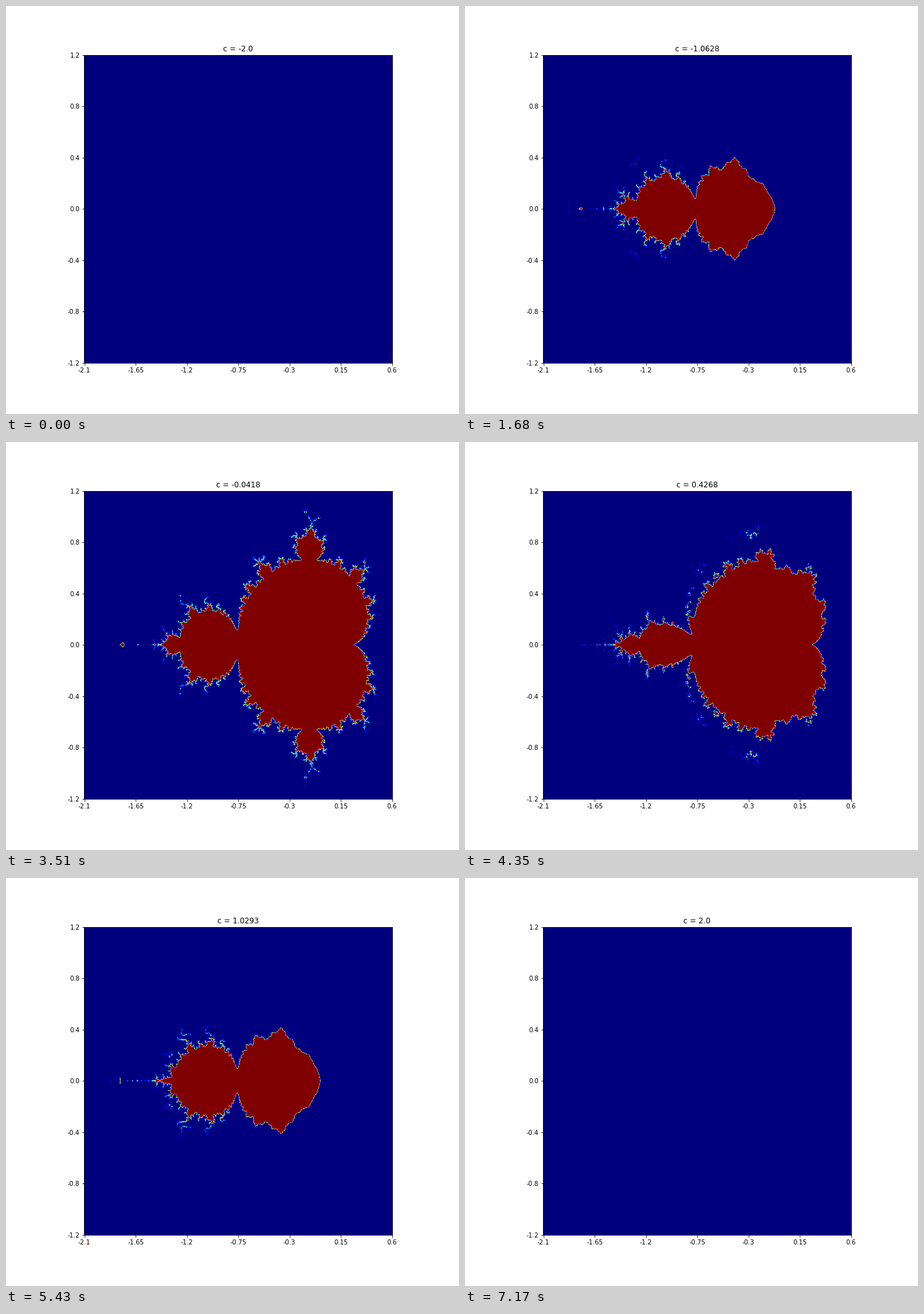
A matplotlib script that plays this animation: 720x648 px, repeating every 7200 ms.

```python
import numpy as np
import matplotlib.pyplot as plt
from matplotlib.animation import FuncAnimation

FRAMES, INTERVAL = 240, 30
N, STEPS = 1200, 25          # samples per side, iterations of z -> z^2 + p
PX = 490                     # pixels the fractal covers on screen

plt.rcParams.update({"font.family": "DejaVu Sans", "font.size": 10})

starts = np.linspace(-2, 2, FRAMES)

# Only the upper half plane is computed: the picture mirrors in the real axis.
re = np.linspace(-2.1, 0.6, N)
im = np.linspace(-1.2, 1.2, N)[N // 2:]
plane = (re + 1j * im[:, None]).astype(np.complex64).ravel()
disc = np.flatnonzero(np.abs(plane) <= 2)
points = plane[disc]


def hann_weights():
    """Matrix that resamples N samples to PX pixels with a Hann filter."""
    centres = (np.arange(PX) + 0.5) * N / PX
    d = (centres[:, None] - np.arange(N) - 0.5) * PX / N
    w = 0.5 + 0.5 * np.cos(np.pi * np.clip(d, -1, 1))
    return (w / w.sum(axis=1, keepdims=True)).astype(np.float32)


weights = hann_weights()
across = np.ascontiguousarray(weights.T)
upright = weights[:, N // 2:] + weights[:, :N // 2][:, ::-1]


def bounded(c):
    """Mask of the points p whose orbit from z = c stays within |z| <= 2."""
    z, p, ids = c * c + points, points, disc
    for n in range(1, STEPS + 1):
        if n > 1:
            z *= z
            z += p
        if n < 6 or n % 5 == 0:
            keep = np.flatnonzero(z.real ** 2 + z.imag ** 2 <= 4)
            z, p, ids = z[keep], p[keep], ids[keep]
    height = ids[-1] // N + 1 if ids.size else 1
    mask = np.zeros(height * N, np.float32)
    mask[ids] = 1
    return mask.reshape(height, N)


cache = {}


def picture(i):
    k = min(i, FRAMES - 1 - i)     # c and -c give the same set
    if k not in cache:
        mask = bounded(float(starts[k]))
        level = upright[:, :len(mask)] @ (mask @ across)
        cache[k] = np.minimum(level * 256, 255).astype(np.uint8)
    return cache[k]


fig, ax = plt.subplots(figsize=(10, 9), dpi=72, facecolor="white")
fig.subplots_adjust(left=0.125, right=0.9, bottom=0.125, top=0.88)
image = ax.imshow(picture(0), cmap="jet", vmin=0, vmax=255,
                  interpolation="nearest",
                  extent=(-0.5, N - 0.5, N - 0.5, -0.5))
ticks = np.linspace(0, N, 7)
ax.set_xticks(ticks, [str(round(-2.1 + 0.45 * k, 2)) for k in range(7)])
ax.set_yticks(ticks, [str(round(0.4 * (3 - k), 1)) for k in range(7)])
ax.set_xlim(-0.5, N)
ax.set_ylim(N, -0.5)
title = ax.set_title("")


def update(i):
    image.set_data(picture(i))
    title.set_text(f"c = {round(float(starts[i]), 4)}")
    return image, title


anim = FuncAnimation(fig, update, frames=FRAMES, interval=INTERVAL,
                     repeat=True, repeat_delay=0, blit=False)
plt.show()
```
